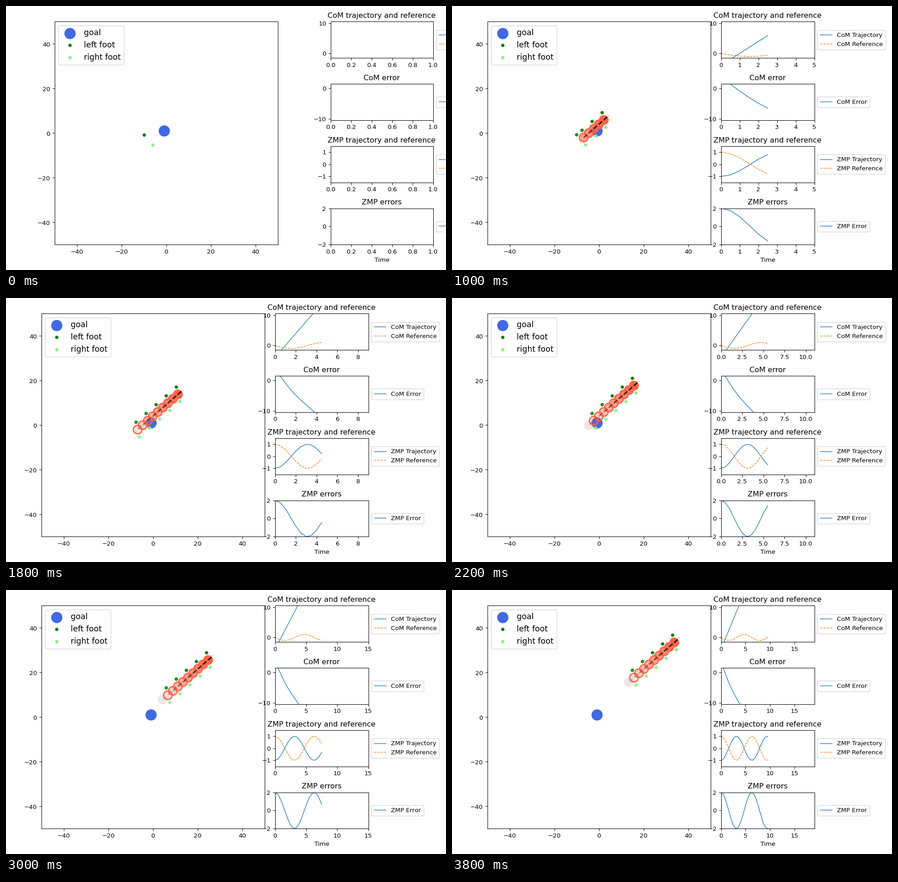
Animation of 966 by 580 pixels, one loop 4 s. Source, as a matplotlib script:

```python
import numpy as np
import matplotlib.pyplot as plt
from matplotlib.animation import FuncAnimation
from matplotlib.collections import LineCollection
from matplotlib.colors import to_rgba

W, H, DPI = 966, 580, 96.6
FRAMES, DT = 20, 0.5
TRAIL, STEPS = 10, 5  # remembered body poses and footprints per foot

plt.rcParams["font.family"] = "DejaVu Sans"
fig = plt.figure(figsize=((W + 0.01) / DPI, (H + 0.01) / DPI), dpi=DPI,
                 facecolor="white")


def box(left, top, right, bottom):
    """Pixel rectangle, measured from the top left, as figure fractions."""
    return [left / W, 1 - bottom / H, (right - left) / W, (bottom - top) / H]


def com(j):
    """Centre of mass after j steps."""
    return np.array([-9.095 + 2.255 * j, -3.92 + 1.97 * j])


def faded(color, alphas):
    return [to_rgba(color, a) for a in alphas]


# Walking area
area = fig.add_axes(box(106.5, 34.5, 596.5, 524.5))
area.set(xlim=(-50, 50), ylim=(-50, 50))
for ticks in (area.set_xticks, area.set_yticks):
    ticks(range(-40, 41, 20))
area.scatter(-0.9, 1.1, s=300, color="royalblue", label="goal")
feet = {
    "left": area.scatter([], [], s=20, color="green", label="left foot"),
    "right": area.scatter([], [], s=20, color="lightgreen", label="right foot"),
}
body = area.scatter([], [], s=200, color="tomato", linewidths=2)
heading = LineCollection([], linestyles="--", linewidths=2)
area.add_collection(heading, autolim=False)
area.legend(loc="upper left", fontsize=13)

FOOT_COLOR = {"left": "green", "right": "lightgreen"}
FOOT_START = {"left": (-9.95, -0.7), "right": (-6.02, -5.2)}
FOOT_SHIFT = {"left": (-0.71, 3.28), "right": (3.15, -1.27)}
FOOT_FIRST = {"left": 1, "right": 2}

# Plots: title, legend name, y limits, y ticks, curves
PLOTS = [
    ("CoM trajectory and reference", "CoM", (-1.5, 10.5), (0, 10),
     {"Trajectory": lambda t: com(t / DT)[1], "Reference": lambda t: -np.sin(t)}),
    ("CoM error", "CoM", (-10.5, 1.5), (-10, 0),
     {"Error": lambda t: -np.sin(t) - com(t / DT)[1]}),
    ("ZMP trajectory and reference", "ZMP", (-1.5, 1.5), (-1, 0, 1),
     {"Trajectory": lambda t: -np.cos(t), "Reference": np.cos}),
    ("ZMP errors", "ZMP", (-2, 2), (-2, 0, 2),
     {"Error": lambda t: 2 * np.cos(t)}),
]


def plot_box(row, left, right):
    top = 34.5 + 136.67 * row
    return box(left, top, right, top + 79.8)


plots, curves = [], []
for row, (title, name, ylim, yticks, funcs) in enumerate(PLOTS):
    ax = fig.add_axes(plot_box(row, 712.5, 937.5))
    ax.set_title(title)
    for (kind, func), style in zip(funcs.items(), ("-", "--")):
        line, = ax.plot([], [], style, lw=1, label=f"{name} {kind}")
        curves.append((line, func))
    ax.set(ylim=ylim, yticks=yticks)
    ax.legend(loc="center left", bbox_to_anchor=(1, 0.5))
    plots.append(ax)
plots[-1].set_xlabel("Time")


def place(k):
    """The layout tightens once after the first picture."""
    shift = 0 if k == 0 else -29
    area.set_position(box(106.5 + shift, 34.5, 596.5 + shift, 524.5))
    left, right = (712.5, 937.5) if k == 0 else (590.5, 795.5)
    for row, ax in enumerate(plots):
        ax.set_position(plot_box(row, left, right))
        ax.set_xlim(0, max(k, 1) * 2 * DT)


def draw_feet(k):
    for side, dots in feet.items():
        prints = [FOOT_START[side]]
        prints += [com(j) + FOOT_SHIFT[side]
                   for j in range(FOOT_FIRST[side], k + 1, 2)]
        prints = prints[-STEPS:]
        dots.set_offsets(prints)
        ages = np.arange(len(prints))[::-1]
        dots.set_facecolor(faded(FOOT_COLOR[side], 1 - 0.06 * ages))


def draw_body(k):
    poses = range(max(1, k - TRAIL + 1), k + 1)
    alphas = [1 - (k - j) / TRAIL for j in poses]
    colors, sizes, widths = faded("tomato", alphas), [200] * len(poses), [2] * len(poses)
    if len(poses) == TRAIL:  # the last remnant is a flat grey disc
        colors[0], sizes[0], widths[0] = to_rgba("#805f4b", 0.15), 245, 0
    body.set_offsets([com(j) for j in poses] or np.empty((0, 2)))
    body.set_facecolor(colors)
    body.set_sizes(sizes)
    body.set_linewidths(widths or [2])
    heading.set_segments([[com(j), com(j + 1)] for j in poses])
    heading.set_color(faded("black", alphas))


def draw(k):
    place(k)
    draw_feet(k)
    draw_body(k)
    t = np.arange(k + 1) * DT
    for line, func in curves:
        line.set_data(t, func(t))
    return []


anim = FuncAnimation(fig, draw, frames=FRAMES, interval=200, repeat=True,
                     repeat_delay=0, blit=False)
plt.show()
```
